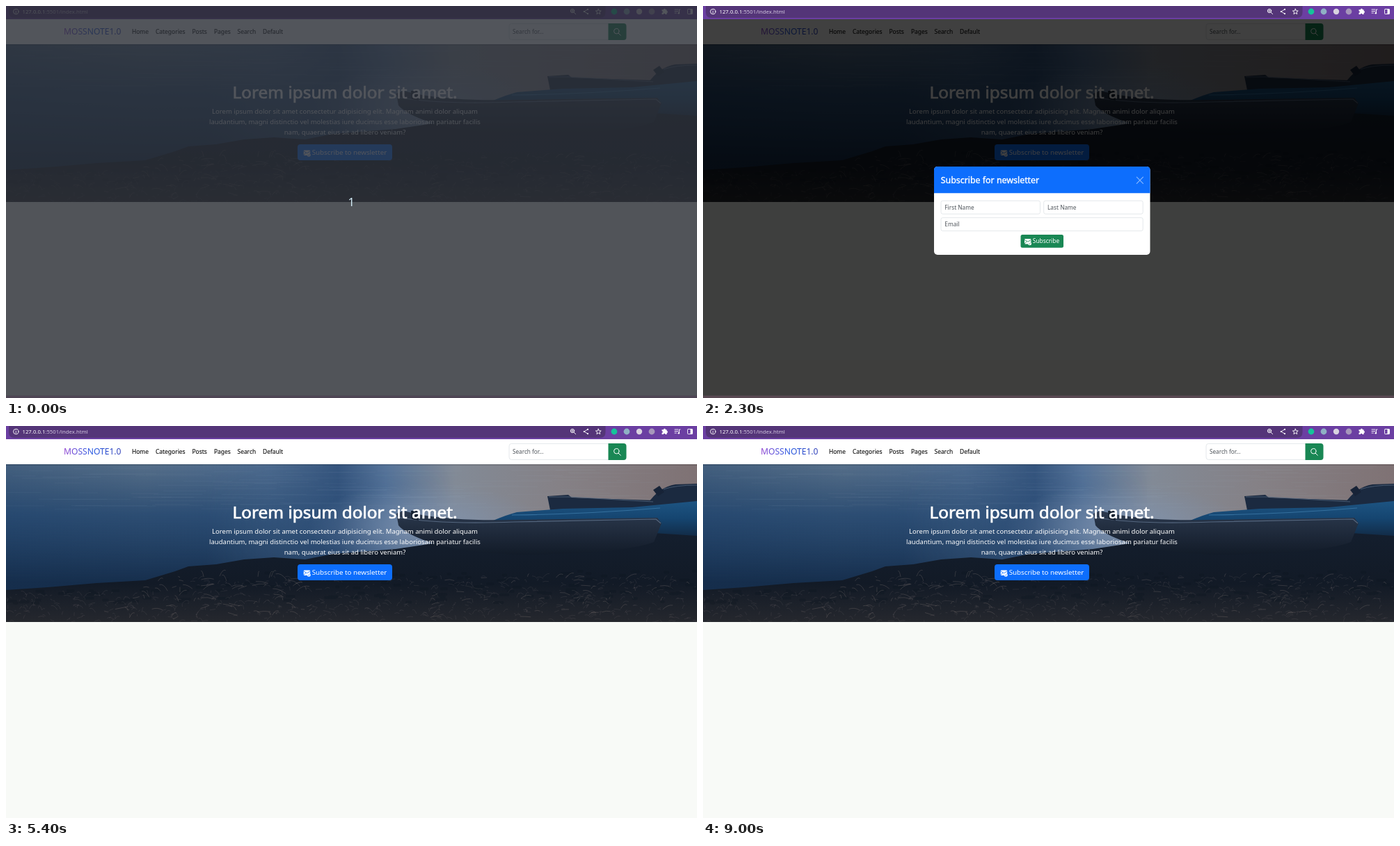
Write an HTML page that moves like this. It is 993 px wide and 564 px high and loops after 9100 ms.

```html
<!DOCTYPE html>
<html lang="en">
<head>
<meta charset="utf-8">
<title>Newsletter modal</title>
<style>
  html, body { margin: 0; width: 100%; height: 100%; overflow: hidden; }
  svg { display: block; width: 100vw; height: 100vh; font: 8.45px "Noto Sans", "Open Sans", sans-serif; }
  .line { fill: none; stroke: #fff; stroke-linecap: round; stroke-linejoin: round; }
  .field { fill: #fff; stroke: #dee2e6; stroke-width: .8; }
  .hint { fill: #50565c; }
  .white { fill: #fff; }
  .mid { text-anchor: middle; }
  .semi { stroke: #fff; stroke-width: .03em; }
</style>
</head>
<body>
<svg viewBox="0 0 993 564" preserveAspectRatio="none">
  <defs>
    <linearGradient id="sky">
      <stop offset="0" stop-color="#44607f"/>
      <stop offset=".2" stop-color="#566f8a"/>
      <stop offset=".38" stop-color="#4d6b8f"/>
      <stop offset=".48" stop-color="#36567f"/>
      <stop offset=".55" stop-color="#56749a"/>
      <stop offset=".65" stop-color="#828a96"/>
      <stop offset=".8" stop-color="#858186"/>
      <stop offset="1" stop-color="#7f7274"/>
    </linearGradient>
    <linearGradient id="dusk" x2="0" y2="1">
      <stop offset="0" stop-color="#1b3c63" stop-opacity="0"/>
      <stop offset=".32" stop-color="#1b3f69" stop-opacity=".7"/>
      <stop offset=".75" stop-color="#142c4a" stop-opacity=".97"/>
    </linearGradient>
    <linearGradient id="ground" x2="0" y2="1">
      <stop offset="0" stop-color="#141f2f"/>
      <stop offset=".6" stop-color="#121a26"/>
      <stop offset="1" stop-color="#26282e"/>
    </linearGradient>
    <linearGradient id="hull" x2="0" y2="1">
      <stop offset="0" stop-color="#2b394e"/>
      <stop offset=".5" stop-color="#1f2a3b"/>
      <stop offset="1" stop-color="#121b28"/>
    </linearGradient>
    <linearGradient id="blueHull" x2="0" y2="1">
      <stop offset="0" stop-color="#1d5482"/>
      <stop offset=".5" stop-color="#154570"/>
      <stop offset="1" stop-color="#122c48"/>
    </linearGradient>
    <linearGradient id="brand">
      <stop offset="0" stop-color="#9548d2"/>
      <stop offset=".5" stop-color="#2458e2"/>
      <stop offset="1" stop-color="#3442b8"/>
    </linearGradient>
    <radialGradient id="glow">
      <stop offset="0" stop-color="#8296b3" stop-opacity=".8"/>
      <stop offset="1" stop-color="#7b90ae" stop-opacity="0"/>
    </radialGradient>
    <filter id="soft"><feGaussianBlur stdDeviation=".6"/></filter>
    <clipPath id="heroClip"><path d="M0 55H993V282H0Z"/></clipPath>
    <g id="mail">
      <path fill="#fff" d="M0 1.2Q0 0 1.2 0H8.3Q9.5 0 9.5 1.2V4.5Q6 3.5 5 7.5H1.2Q0 7.5 0 6.3Z"/>
      <path fill="none" stroke="currentColor" stroke-width=".8" d="M0 1.3 4.75 4.2 9.5 1.3M0 7 3.4 3.8"/>
      <circle cx="7.5" cy="6.8" r="2.5" fill="#fff"/>
      <path fill="none" stroke="currentColor" stroke-width=".7" d="M6.3 6.8 7.2 7.7 8.7 5.9"/>
    </g>
  </defs>

  <rect width="993" height="564" fill="#f8faf7"/>

  <g clip-path="url(#heroClip)">
    <rect y="55" width="993" height="227" fill="url(#sky)"/>
    <rect id="shade" y="55" width="640" height="227" fill="url(#dusk)"/>
    <ellipse cx="605" cy="145" rx="170" ry="62" fill="url(#glow)"/>
    <path id="ripples" fill="none" stroke="#b4c0d0" stroke-opacity=".05"/>
    <g filter="url(#soft)">
      <path fill="url(#ground)" d="M0 236 60 232 130 226 200 222 243 209 262 202 302 199 342 192 385 189 430 192 470 184 520 180 560 177 600 171 660 160 993 140V284H0Z"/>
      <path fill="#1b2a40" d="M922 112Q938 88 962 84L993 83V116ZM778 101 808 99 813 103 932 107 993 104V124L782 121Z"/>
      <path fill="#172337" d="M930 92 939 86 946 95 937 101Z"/>
      <path fill="none" stroke="#52657d" stroke-width=".8" d="M780 102H810L930 109M945 91Q962 85 993 85"/>
      <path fill="url(#blueHull)" d="M700 136Q722 127 734 124L800 119 900 117 993 108V158L900 152Z"/>
      <path fill="none" stroke="#35709e" stroke-width="1.2" d="M727 128Q830 127 940 118"/>
      <path fill="url(#hull)" d="M561 126 571 122 592 127Q650 137 725 135L936 132 942 140 931 167Q885 184 742 185 650 183 600 164 572 153 564 143Z"/>
      <path fill="none" stroke="#55677f" stroke-width="1.2" d="M562 131Q620 142 730 138L934 134 941 140"/>
      <path fill="#14202f" d="M582 122H591L593 136 583 134Z"/>
    </g>
    <path id="pebbles" fill="none" stroke="#0c141f" stroke-width="4" stroke-linecap="round" stroke-opacity=".3"/>
    <path id="grass" fill="none" stroke="#a69a98" stroke-width=".7" stroke-opacity=".17"/>
    <path id="straw" fill="none" stroke="#bfa9a0" stroke-width=".7" stroke-opacity=".28"/>
  </g>

  <g class="white mid" font-size="9.5">
    <text class="semi" x="487" y="132.5" font-size="24.4">Lorem ipsum dolor sit amet.</text>
    <text x="487" y="154.5">Lorem ipsum dolor sit amet consectetur adipisicing elit. Magnam animi dolor aliquam</text>
    <text x="487" y="169.5">laudantium, magni distinctio vel molestias iure ducimus esse laboriosam pariatur facilis</text>
    <text x="487" y="184.5">nam, quaerat eius sit ad libero veniam?</text>
  </g>
  <rect id="openButton" x="419" y="199" width="136" height="23" rx="4"/>
  <use href="#mail" x="427.7" y="207.5" color="#0d6efd"/>
  <text class="white" x="439.7" y="213.8" font-size="9.75">Subscribe to newsletter</text>

  <rect y="55" width="993" height="2" fill="#000" opacity=".12"/>
  <rect y="19" width="993" height="36" fill="#fff"/>
  <text x="83" y="41.3" font-size="12.1" fill="url(#brand)">MOSSNOTE1.0</text>
  <g id="nav" fill="#111" stroke="#111" stroke-width=".12"></g>
  <rect class="field" x="723" y="25.4" width="146" height="23" rx="3.5"/>
  <text class="hint" x="728" y="39.7" font-size="8.2">Search for...</text>
  <path fill="#198754" d="M865.5 25H887.5Q891.5 25 891.5 29V45Q891.5 49 887.5 49H865.5Z"/>
  <path class="line" d="M881 36.2a3.7 3.7 0 1 1-7.4 0 3.7 3.7 0 1 1 7.4 0M880 39 883.3 42.2"/>

  <g id="status">
    <path fill="#553080" d="M0 556.5H52Q54.5 556.5 54.5 559V564H0Z"/>
    <text class="white" x="0" y="565" font-size="8.5">/index.html#</text>
  </g>

  <g id="backdrop">
    <rect y="19" width="993" height="545"/>
    <rect y="560.5" width="993" height="3.5" fill="#5b2748" opacity=".4"/>
  </g>

  <g id="modal">
    <rect x="332" y="231" width="310.5" height="127" rx="5" fill="#fff"/>
    <path fill="#0d6efd" d="M332 269.3V236Q332 231 337 231H637.5Q642.5 231 642.5 236V269.3Z"/>
    <text class="white semi" x="341.7" y="254.7" font-size="12.4">Subscribe for newsletter</text>
    <path id="closeMark" class="line" stroke-width="1.2" d="M623.3 246.2 632.4 255.3M632.4 246.2 623.3 255.3"/>
    <rect id="closeRing" x="616.3" y="238.3" width="22.5" height="23.5" rx="4" fill="none" stroke="#fff" stroke-width="2.5" stroke-opacity=".3"/>
    <rect class="field" x="342" y="280.2" width="142.5" height="19" rx="2.5"/>
    <rect class="field" x="489.7" y="280.2" width="142.5" height="19" rx="2.5"/>
    <rect class="field" x="342" y="304.6" width="290.2" height="19" rx="2.5"/>
    <g class="hint" font-size="8.3">
      <text x="347.3" y="292.6">First Name</text>
      <text x="495" y="292.6">Last Name</text>
      <text x="347.3" y="317">Email</text>
    </g>
    <rect id="sendButton" x="456.5" y="329" width="61.5" height="18.8" rx="2.5"/>
    <use href="#mail" x="462" y="335" color="#198754"/>
    <text class="white" x="473.8" y="341.2" font-size="8.35">Subscribe</text>
  </g>

  <g id="toolbar">
    <rect width="993" height="19" fill="#6b3fa2"/>
    <path fill="#543578" d="M4 0H861.5V9Q861.5 17 853.5 17H12Q4 17 4 9Z"/>
    <text class="white" x="23.5" y="11" font-size="7.75">127.0.0.1<tspan fill="#d2c6df">:5501/index.html</tspan></text>
    <g class="line" stroke-width=".9">
      <circle cx="14.3" cy="8" r="3.7"/>
      <path d="M14.3 7.6V10M14.3 5.9V6"/>
      <circle cx="814" cy="7" r="2.7"/>
      <path d="M816.2 9.2 818.7 11.7M812.7 7H815.3M814 5.7V8.3M835.5 5 831 8 835.5 11"/>
      <path d="M851.3 4.2 852.4 6.8 855.2 7 853 8.8 853.7 11.6 851.3 10.1 848.9 11.6 849.6 8.8 847.4 7 850.2 6.8Z"/>
      <path d="M961 5H966M961 7.5H966M961 10H963.5M967.5 10V5H969"/>
      <rect x="979.5" y="4.5" width="7" height="7" rx=".8"/>
    </g>
    <g class="white">
      <circle cx="836" cy="4.9" r="1.1"/><circle cx="830.8" cy="8" r="1.1"/><circle cx="836" cy="11.1" r="1.1"/>
      <circle cx="966.8" cy="10.3" r="1.3"/>
      <path d="M983.5 4.5H986.5V11.5H983.5Z"/>
      <path d="M942.5 5.2H945a1.4 1.4 0 0 1 2.8 0H949.6V7.2a1.4 1.4 0 0 1 0 2.8V12H947.4a1.3 1.3 0 0 0-2.6 0H942.5V9.8a1.3 1.3 0 0 0 0-2.6Z"/>
    </g>
    <circle cx="874" cy="8" r="4.4" fill="#15c39a"/>
    <circle cx="892" cy="8" r="4.4" fill="#8fb0c4"/>
    <circle cx="910" cy="8" r="4.2" fill="#d8d2df"/>
    <circle cx="928" cy="8" r="4.4" fill="#a797bb"/>
  </g>

  <g id="countdown">
    <rect width="993" height="564" fill="#2a2e36" opacity=".81"/>
    <rect y="560.5" width="993" height="3.5" fill="#4a2d4b" opacity=".4"/>
    <text class="mid" x="496.3" y="288" font-size="16.5" fill="#d3edf8">1</text>
  </g>
</svg>
<script>
const LOOP = 9100, STEP = 100;
const el = id => document.getElementById(id);

const menu = { Home: 181, Categories: 215, Posts: 267.5, Pages: 299, Search: 332.5, Default: 369 };
el('nav').innerHTML = Object.entries(menu)
  .map(([label, x]) => `<text x="${x}" y="39.7">${label}</text>`).join('');

// Seeded noise for water, stones and grass
let seed = 7;
const random = (min, max) => {
  seed = (seed * 16807) % 2147483647;
  return min + (max - min) * seed / 2147483647;
};
const strokes = (count, make) => Array.from({ length: count }, make).join('');
const blade = (x, y, reach, lift) => {
  const dx = random(-reach, reach), dy = random(-lift, lift / 2);
  return `M${x} ${y}q${dx / 2} ${dy - random(0, 3)} ${dx} ${dy}`;
};
el('ripples').setAttribute('d', strokes(110, () =>
  `M${random(0, 900)} ${random(56, 120)}h${random(25, 130)}`));
el('pebbles').setAttribute('d', strokes(130, () => {
  const x = random(0, 993);
  return `M${x} ${random(x < 250 ? 236 : 207, 255)}h${random(2, 14)}`;
}));
el('grass').setAttribute('d', strokes(620, () => {
  const x = random(0, 993);
  return blade(x, random(x < 250 ? 240 : 218, 282), 10, 6);
}));
el('straw').setAttribute('d', strokes(70, () => blade(random(170, 440), random(216, 276), 20, 9))
  + strokes(50, () => blade(random(600, 993), random(215, 276), 16, 8)));

// Fade the dusk out toward the bright side of the water
el('shade').style.maskImage = 'linear-gradient(90deg, #000 45%, transparent)';

// Linear interpolation through [time, value] pairs
const track = (t, keys) => {
  const next = keys.findIndex(([time]) => time > t);
  if (next === 0) return keys[0][1];
  if (next < 0) return keys[keys.length - 1][1];
  const [t0, v0] = keys[next - 1], [t1, v1] = keys[next];
  return v0 + (v1 - v0) * (t - t0) / (t1 - t0);
};
const mix = (from, to, k) => `rgb(${from.map((c, i) => c + (to[i] - c) * k)})`;
const within = (t, from, to) => t >= from && t < to;

const openHover = [[1000, 0], [1100, .6], [1200, 1], [2000, 1], [2200, 0],
  [6300, 0], [6400, .6], [6500, 1], [6900, 1], [7100, 0]];
const statusFade = [[1200, 0], [1500, 1], [2000, 1], [2300, 0],
  [6400, 0], [6600, 1], [6900, 1], [7200, 0]];
const backdropFade = [[1800, 0], [1900, .31], [2000, .75], [4600, .75], [4800, 0],
  [6600, 0], [6700, .2], [6800, .6], [6900, .75], [8200, .75], [8400, 0]];
const modalFade = [[1900, 0], [2000, .15], [2100, .6], [2200, .9], [2300, 1],
  [4500, 1], [4600, .55], [4700, .1], [4800, 0],
  [6800, 0], [6900, .2], [7000, .65], [7100, .92], [7200, 1],
  [8000, 1], [8100, .6], [8200, .2], [8300, 0]];
const sendHover = [[3000, 0], [3100, .6], [3200, 1], [3300, 1], [3500, 0]];

function draw(now) {
  const t = Math.floor(now % LOOP / STEP) * STEP;
  const modal = track(t, modalFade);
  const closeFocus = within(t, 4300, 4800);
  const closeHover = within(t, 3800, 4800) || within(t, 7600, 8400);

  el('countdown').style.display = t < 100 ? '' : 'none';
  el('openButton').style.fill = mix([13, 110, 253], [11, 94, 215], track(t, openHover));
  el('status').style.opacity = track(t, statusFade);
  el('backdrop').style.opacity = track(t, backdropFade);
  el('modal').style.opacity = modal;
  el('modal').setAttribute('transform', `translate(0 ${-31 * (1 - modal)})`);
  el('sendButton').style.fill = mix([25, 135, 84], [21, 115, 71], track(t, sendHover));
  el('closeMark').style.opacity = closeFocus ? 1 : closeHover ? .8 : .5;
  el('closeRing').style.display = closeFocus ? '' : 'none';
  requestAnimationFrame(draw);
}
draw(0);
</script>
</body>
</html>
```
